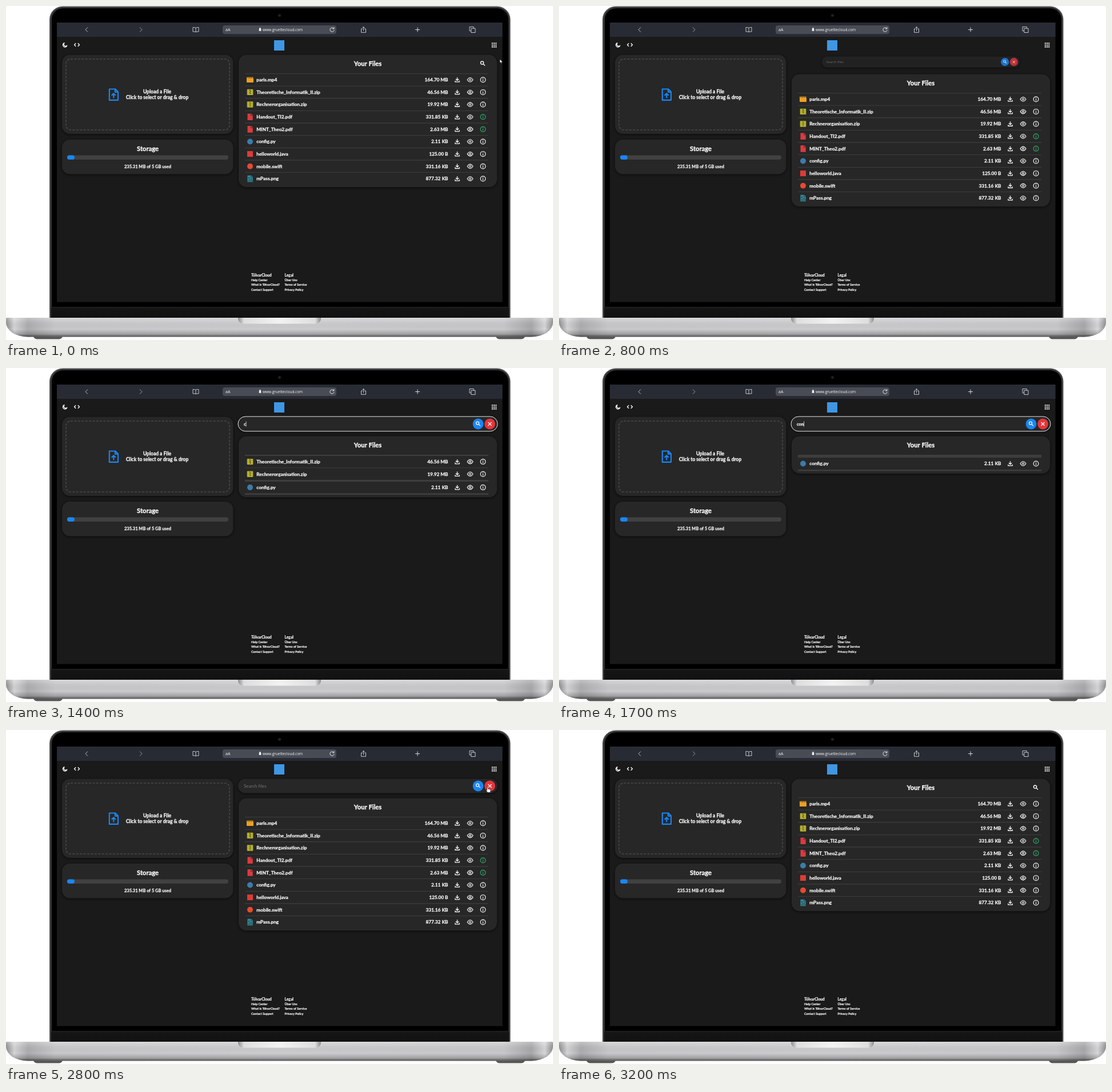
An HTML page with a canvas that plays this animation: 957x585 px, repeating every 3.7 s.

```html
<!DOCTYPE html>
<html lang="en">
<head>
<meta charset="utf-8">
<title>File search</title>
<style>
html, body { margin: 0; width: 100%; height: 100%; overflow: hidden; background: #fff; }
canvas { display: block; }
</style>
</head>
<body>
<canvas id="stage" width="957" height="585"></canvas>
<script>
const ctx = document.getElementById('stage').getContext('2d');
const LOOP = 3700, STEP = 100;
const WHITE = '#f8f8f8', BLUE = '#1a86f5', RED = '#e5353b', PAGE = '#1a1a1a', PANEL = '#272727';
const ROW = 20.8, LINE = 0.85;

const FILES = [
  ['paris.mp4', '164.70 MB', film],
  ['Theoretische_Informatik_II.zip', '46.56 MB', archive],
  ['Rechnerorganisation.zip', '19.92 MB', archive],
  ['Handout_TI2.pdf', '331.85 KB', pdf, '#2fae6b'],
  ['MINT_Theo2.pdf', '2.63 MB', pdf, '#2fae6b'],
  ['config.py', '2.11 KB', y => disc(427, y, 5, '#3b7cab')],
  ['helloworld.java', '125.00 B', y => box(422, y - 5, 10, 10, 0, '#dd3b38')],
  ['mobile.swift', '331.16 KB', y => disc(427, y, 5, '#e8492f')],
  ['mPass.png', '877.32 KB', picture],
];

function box(x, y, w, h, r, fill, stroke, width = 1) {
  ctx.beginPath();
  ctx.roundRect(x, y, w, h, r);
  if (fill) { ctx.fillStyle = fill; ctx.fill(); }
  if (stroke) { ctx.strokeStyle = stroke; ctx.lineWidth = width; ctx.stroke(); }
}

function disc(x, y, r, fill) {
  ctx.beginPath();
  ctx.arc(x, y, r, 0, 7);
  ctx.fillStyle = fill;
  ctx.fill();
}

// Strokes an SVG path around (x, y); a fill colour is optional.
function icon(d, x, y, stroke = WHITE, width = 1.2, fill) {
  const path = new Path2D(d);
  ctx.save();
  ctx.translate(x, y);
  ctx.lineJoin = 'round';
  if (fill) { ctx.fillStyle = fill; ctx.fill(path); }
  if (stroke) { ctx.strokeStyle = stroke; ctx.lineWidth = width; ctx.stroke(path); }
  ctx.restore();
}

// y is the middle of the capitals.
function text(s, x, y, size, align = 'left', color = WHITE, font = '', family = 'Lato') {
  ctx.font = `${font} ${size}px ${family}, sans-serif`;
  ctx.textAlign = align;
  ctx.fillStyle = color;
  ctx.fillText(s, x, y + size * 0.35);
}

// Bold text with a fine outline for extra weight.
function heavy(s, x, y, size, align) {
  text(s, x, y, size, align, WHITE, 'bold');
  ctx.strokeStyle = WHITE;
  ctx.lineWidth = size * 0.035;
  ctx.lineJoin = 'round';
  ctx.strokeText(s, x, y + size * 0.35);
}

function gradient(x0, y0, x1, y1, ...stops) {
  const g = ctx.createLinearGradient(x0, y0, x1, y1);
  stops.forEach(([at, color]) => g.addColorStop(at, color));
  return g;
}

function panel(x, y, w, h, r = 14) {
  ctx.save();
  ctx.shadowColor = '#000a';
  ctx.shadowBlur = 5;
  ctx.shadowOffsetY = 1;
  box(x, y, w, h, r, PANEL);
  ctx.restore();
}

function magnifier(x, y, k = 1) {
  icon(`M${k} ${k}L${4 * k} ${4 * k}M${1.6 * k} ${-k}a${2.6 * k} ${2.6 * k} 0 1 1 ${-5.2 * k} 0a${2.6 * k} ${2.6 * k} 0 1 1 ${5.2 * k} 0`, x, y, WHITE, 1.4 * k);
}

function film(y) {
  box(421, y - 4.8, 12, 9.6, 1, '#eda022');
  for (let i = 0; i < 4; i++) icon('M0-5L1.2-2.4', 422.7 + i * 2.9, y, PANEL, 0.9);
}

function archive(y) {
  box(421.7, y - 5.2, 10.6, 10.4, 1, '#b5af2d');
  icon('M-1.2-3.5H.6M-.4-1.5H1.4M-1.2.5H.6M-.4 2.5H1.4', 427, y, '#343522', 1.1);
}

function sheet(y, color) {
  icon('M-4.5-5.8H2L4.7-3V5.8H-4.5Z', 427, y, null, 1, color);
  icon('M1.5-5V-2.4H4', 427, y, PANEL, 0.8);
}

function pdf(y) {
  sheet(y, '#db3a3f');
}

function picture(y) {
  sheet(y, '#2f8b9b');
  icon('M-3 4L-1 .8L.5 2.5L2-.5L3.5 4Z', 427, y, PANEL, 0.6);
  disc(425, y - 1.5, 1, PANEL);
}

function laptop() {
  ctx.fillStyle = '#fff';
  ctx.fillRect(0, 0, 957, 585);
  box(76, 0.5, 806.5, 546, [23, 23, 0, 0], '#5c5c5e');
  box(77.3, 1.8, 803.9, 545, [22, 22, 0, 0], '#343436');
  box(80, 4, 799, 542, [20, 20, 0, 0], '#000');
  box(79, 527, 801, 20, 0, gradient(0, 527, 0, 546, [0, '#222'], [.15, '#151515'], [1, '#111']));
  disc(478.5, 16.5, 2.8, '#17181c');
  disc(478.5, 16.5, 1.1, '#2a2d3a');
  for (const x of [48, 857]) box(x, 577, 51, 6.5, [0, 0, 6, 6], '#555');
  const corner = { x: 38, y: 25 };
  const base = [0, 546, 957, 33.5, [2, 2, corner, corner]];
  box(...base, gradient(0, 0, 957, 0, [0, '#8c8c8e'], [.015, '#d6d6d8'], [.04, '#adadaf'], [.09, '#c9c9cb'],
    [.5, '#cdcdcf'], [.91, '#c9c9cb'], [.96, '#a8a8aa'], [.985, '#d8d8da'], [1, '#8c8c8e']));
  box(...base, gradient(0, 546, 0, 579.5, [0, '#fff4'], [.12, '#fff2'], [.6, '#0000'], [.85, '#0003'], [1, '#0009']));
  box(406, 546, 145, 10.5, [0, 0, 9, 9], gradient(406, 0, 551, 0, [0, '#8b8b8b'], [.07, '#dedede'], [.5, '#f2f2f2'], [.93, '#dedede'], [1, '#8b8b8b']));
}

function browser() {
  box(89, 29, 779.5, 489.5, 0, PAGE);
  box(89, 29, 779.5, 25, 0, '#282b34');
  icon('M2-4L-2 0L2 4', 141, 41.5, '#d0d0d4', 0.9);
  icon('M-2-4L2 0L-2 4', 236, 41.5, '#a8a8ae', 0.9);
  icon('M0-3Q-2-4.5-5-4V3.5Q-2 3 0 4Q2 3 5 3.5V-4Q2-4.5 0-3V4', 332, 41.5, '#d8d8dc', 0.9);
  box(379, 34, 199, 15, 4, '#494c55');
  text('aA', 384, 41.5, 7, 'left', WHITE, '', 'Open Sans');
  icon('M-1.8 0H1.8V2.8H-1.8ZM-1.2 0V-1.4A1.2 1.2 0 0 1 1.2-1.4V0', 444.5, 41, null, 1, WHITE);
  icon('M-1.2 0V-1.4A1.2 1.2 0 0 1 1.2-1.4V0', 444.5, 41, WHITE, 0.7);
  text('www.gruettecloud.com', 449, 41.5, 6.5, 'left', WHITE, '', 'Open Sans');
  icon('M3-2A3.6 3.6 0 1 0 3.6 .5M3.4-4.5V-1.6H.6', 570.5, 41.5, WHITE, 0.9);
  icon('M-1.5-1.5H-4V4.8H4V-1.5H1.5M0 2V-5M-2-3.2L0-5.2L2-3.2', 625.5, 41.5, '#d8d8dc', 0.9);
  icon('M-4 0H4M0-4V4', 720, 41.5, '#d8d8dc', 1);
  icon('M-2.2-2.2H5V5H-2.2ZM-2.4 2.2H-5V-5H2.2V-2.4', 816, 41.5, '#d8d8dc', 0.9);

  icon('M-1-3.6A3.7 3.7 0 1 0 3.7 1A3.1 3.1 0 0 1-1-3.6Z', 103, 68.3, WHITE, 1.4);
  icon('M-1.8-2.7L-4.5 0L-1.8 2.7M1.8-2.7L4.5 0L1.8 2.7', 124, 68, WHITE, 1.4);
  box(469, 60, 18, 18, 0, '#3f97e3');
  for (let i = 0; i < 9; i++) box(849.8 + i % 3 * 3.2, 64.2 + (i / 3 | 0) * 3.2, 2.1, 2.1, 0.4, WHITE);
}

function sidebar() {
  panel(98, 85.5, 299.5, 138.5);
  ctx.setLineDash([4, 2.4]);
  box(105, 93, 286, 124, 8, null, '#474747', 1.6);
  ctx.setLineDash([]);
  icon('M-7.5-9.7H3L7.7-5V9.7H-7.5ZM2.6-9.5V-4.6H7.5M0 6V-1.5M-3.6 1.6L0-2L3.6 1.6', 188.3, 155.2, BLUE, 2.1);
  heavy('Upload a File', 264.5, 150, 8.5, 'center');
  heavy('Click to select or drag & drop', 264.5, 160.5, 8.5, 'center');

  panel(98, 234, 299.5, 60.5);
  heavy('Storage', 248, 250, 11.2, 'center');
  box(107, 261.5, 282, 7.5, 3.7, '#414141');
  box(107, 261.5, 13, 7.5, 3.7, BLUE);
  heavy('235.31 MB of 5 GB used', 248, 281, 7.5, 'center');
}

function footer() {
  const column = (x, title, links) => {
    heavy(title, x, 471.5, 6.7);
    links.forEach((s, i) => heavy(s, x, 480.5 + i * 8.1, 5.3));
  };
  column(429, 'TölvarCloud', ['Help Center', 'What is TölvarCloud?', 'Contact Support']);
  column(487.5, 'Legal', ['Über Uns', 'Terms of Service', 'Privacy Policy']);
}

// Rows that do not match collapse to their top border.
function fileList(top, query) {
  const shown = FILES.map(([name]) => name.toLowerCase().includes(query));
  const count = shown.filter(Boolean).length;
  panel(407, top, 452, 37 + FILES.length * LINE + count * ROW);
  heavy('Your Files', 633, top + 16, 11.2, 'center');
  let y = top + 32.5;
  FILES.forEach(([name, size, symbol, infoColor = WHITE], i) => {
    box(418, y, 426, LINE, 0, '#454545');
    y += LINE;
    if (!shown[i]) return;
    const mid = y + ROW / 2;
    symbol(mid);
    heavy(name, 438.3, mid, 8.25);
    heavy(size, 773.5, mid, 8.25, 'right');
    icon('M0-4.2V1M-2.6-1.3L0 1.3L2.6-1.3M-3.7 1.4V3.7H3.7V1.4', 789.5, mid, WHITE, 1.3);
    icon('M-5 0Q0-7.4 5 0Q0 7.4-5 0ZM1.5 0A1.5 1.5 0 1 1-1.5 0A1.5 1.5 0 1 1 1.5 0', 812, mid, WHITE, 1.1);
    icon('M4.4 0A4.4 4.4 0 1 1-4.4 0A4.4 4.4 0 1 1 4.4 0M0-2.5V-1.3M0-.5V2.5', 834.5, mid, infoColor, 1.2);
    y += ROW;
  });
}

function searchBar(scale, focused, query, caret) {
  ctx.save();
  ctx.translate(633, 98);
  ctx.scale(scale, scale);
  ctx.translate(-633, -98);
  ctx.globalAlpha = Math.min(1, scale * 1.05);
  panel(406, 85.5, 454, 25, 12.5);
  if (focused) box(406, 85, 454, 25.8, 12.9, null, '#f0f0f0');
  if (query) heavy(query, 416, 98, 7.5);
  else text('Search files', 416, 98, 8, 'left', '#757575');
  if (caret) {
    ctx.font = 'bold 7.5px Lato, sans-serif';
    box(416 + ctx.measureText(query).width, 93.5, 0.8, 9, 0, WHITE);
  }
  disc(826, 98, 9.4, BLUE);
  magnifier(826, 97.6, 0.95);
  disc(846.5, 98, 9.4, RED);
  icon('M-3-3L3 3M3-3L-3 3', 846.5, 98, WHITE, 1.3);
  ctx.restore();
}

function arrow(x, y) {
  icon('M0 0V7L1.6 5.6L2.7 8L3.8 7.5L2.8 5.2H5Z', x, y, '#000', 0.6, '#fff');
}

function hand(x, y) {
  icon('M0 0Q1.2-1 1.8 .3V3.5L5.6 4.3Q6.7 4.6 6.5 6L5.8 10H1.2L-1.6 6.6Q-1.5 5.2 0 6Z', x, y, '#111', 0.7, '#fff');
}

function draw(t) {
  const open = t >= 500 && t < 3200;
  const focused = t >= 1100 && t < 2800;
  const query = t >= 1400 && t < 2800 ? 'conf'.slice(0, t < 1500 ? 1 : t < 1700 ? 2 : t < 1800 ? 3 : 4) : '';
  laptop();
  browser();
  sidebar();
  footer();
  fileList(open ? 119.5 : 85.5, query);
  if (open) {
    const grow = 1 - Math.max(0, 1 - (t - 500) / 500) ** 1.57;
    const shrink = 1 - Math.max(0, (t - 2800) / 400) ** 1.8;
    searchBar(Math.min(grow, shrink), focused, query, focused && t < 2300);
  } else {
    magnifier(834, 100.6);
  }
  if (t < 100) arrow(864, 93);
  else if (t < 600) hand(837.5, 99);
  else if (t >= 2500 && t < 2600) arrow(846, 104);
  else if (t >= 2600 && t < 3000) hand(841.5, 99.5);
}

function tick() {
  draw(Math.floor(performance.now() % LOOP / STEP) * STEP);
  requestAnimationFrame(tick);
}
tick();
</script>
</body>
</html>
```
